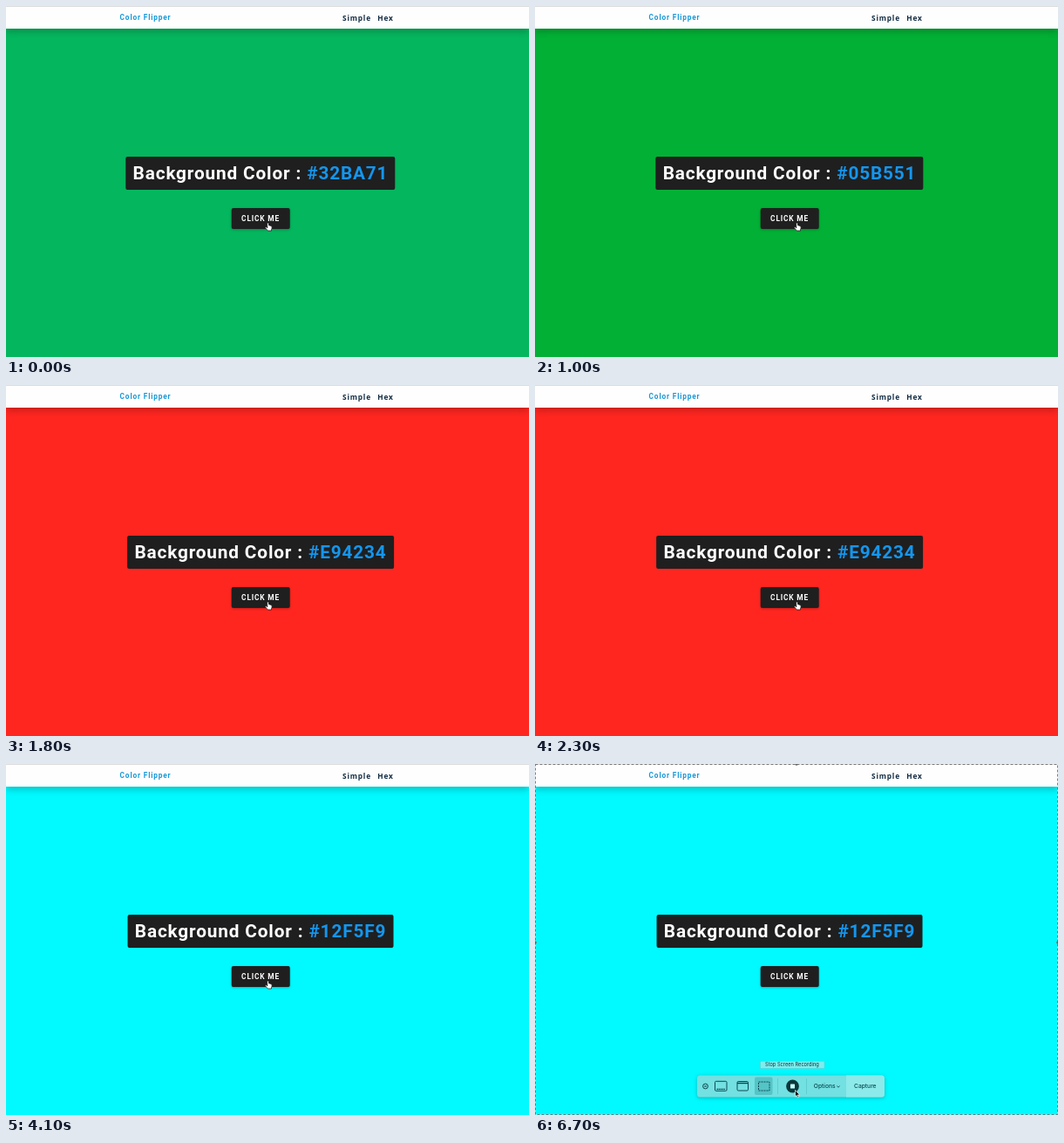
Animation of 600 by 403 pixels, one loop 6.8 s. Source, as an HTML page:

```html
<!DOCTYPE html>
<html lang="en">
<head>
<meta charset="utf-8">
<title>Color Flipper</title>
<style>
  :root { font-size: 8.32px; }
  html, body { margin: 0; width: 100%; height: 100%; overflow: hidden; }
  body { position: relative; letter-spacing: .1rem; font: 700 1rem Roboto, sans-serif; }
  body > * { position: absolute; white-space: nowrap; }
  nav { left: 0; top: 0; width: 600px; height: 26px; box-sizing: border-box; background: #fefefe;
    border-top: 1px solid #dcdcdc; box-shadow: 0 2.6px 7.8px rgba(0, 0, 0, .24); }
  nav span { position: absolute; top: 7px; line-height: 11px; color: #102a42;
    font-family: "Open Sans", sans-serif; }
  nav .logo { left: 130.6px; color: #1698d8; font-family: Roboto, sans-serif; }
  h2, button { left: 292px; transform: translateX(-50%); margin: 0; background: #1f1f1f;
    color: #fff; border-radius: 2px; letter-spacing: .1rem; }
  h2 { top: 173.2px; padding: 1rem; font-size: 2.5rem; line-height: 1; }
  h2 b { color: #1496ee; }
  button { top: 231.5px; height: 24.5px; padding: 0 11.4px; border: 0; font: inherit;
    letter-spacing: .1rem; box-shadow: 0 1px 3px rgba(0, 0, 0, .25); }
  svg { left: 0; top: 0; }
  svg text { font: 500 6.7px Inter, sans-serif; letter-spacing: 0; fill: #0b4a50; }
  svg .tip { font-size: 5.7px; font-weight: 400; fill: #06363a; }
</style>
</head>
<body>
<nav>
  <span class="logo">Color Flipper</span>
  <span style="left:386px">Simple</span>
  <span style="left:426.3px">Hex</span>
</nav>
<h2>Background Color : <b id="hex"></b></h2>
<button>CLICK ME</button>
<svg width="600" height="403" viewBox="0 0 600 403">
  <g id="recorder">
    <rect x=".5" y=".5" width="599" height="402" fill="none" stroke="#fff" stroke-opacity=".5"/>
    <rect x=".5" y=".5" width="599" height="402" fill="none" stroke="#555" stroke-opacity=".75" stroke-dasharray="3 2"/>
    <g fill="#666">
      <circle cx="300" cy="0" r="1.8"/><circle cx="0" cy="205" r="1.8"/><circle cx="600" cy="205" r="1.8"/>
    </g>
    <rect x="186" y="357.5" width="215" height="25" rx="3.5" fill="#73e0e1"
      style="filter:drop-shadow(0 1px 2px rgba(0,60,60,.35))"/>
    <path d="M357 357.5h40.5a3.5 3.5 0 0 1 3.5 3.5v18a3.5 3.5 0 0 1-3.5 3.5H357z" fill="#8deaea"/>
    <rect x="252" y="359.5" width="20.5" height="20.5" rx="2" fill="#55c4c6"/>
    <path d="M278.5 361v18M311.5 361v18" stroke="#5cc9ca" stroke-width=".8"/>
    <g fill="none" stroke="#0b4a50">
      <circle cx="195.5" cy="370" r="2.9"/>
      <path d="M194.3 368.8l2.4 2.4m0-2.4l-2.4 2.4" stroke-width=".8"/>
      <rect x="206.5" y="364.3" width="13.5" height="11" rx="1.2"/>
      <path d="M208.5 373.3h9.5" stroke-width="1.2" stroke-dasharray="1.6 .5"/>
      <rect x="232" y="364.5" width="12.5" height="10.5" rx="1.2"/>
      <path d="M232 366.5h12.5" stroke-width="1.4"/>
      <rect x="256.5" y="365" width="12.5" height="10" stroke-dasharray="2 1"/>
      <path d="M346.3 369.6l1.7 1.6 1.7-1.6" stroke-width=".9"/>
    </g>
    <circle cx="295.5" cy="370" r="7.4" fill="#08383c"/>
    <rect x="293" y="367.5" width="5" height="5" rx=".5" fill="#c8ffff"/>
    <text x="319.8" y="372.4">Options</text>
    <text x="366" y="372.4">Capture</text>
    <g id="tip">
      <rect x="258.5" y="341.2" width="73.5" height="8.4" fill="#80eced" stroke="#5fd0d2" stroke-width=".6"/>
      <text class="tip" x="264" y="347.4">Stop Screen Recording</text>
    </g>
  </g>
  <g id="cursor" stroke-linejoin="round">
    <path id="hand" fill="#fff" stroke="#111" stroke-width=".7"
      d="M-1 .6Q0-.6 .8.6L1.2 3 2.4 3.1 3.4 3.6 4.5 4Q5 6.2 4 7.6V9H-.2L-3 5.7Q-3.2 4.4-1.9 4.8L-.6 5.8Z"/>
    <path id="arrow" fill="#000" stroke="#fff" stroke-width=".7"
      d="M0 0V7.4L1.7 5.9 2.9 8.6 4.1 8.1 2.9 5.4H5.2Z"/>
  </g>
</svg>
<script>
  const LOOP = 6800, STEP = 100;
  // start time, label, page colour
  const flips = [
    [0, "#32BA71", "#04b65e"],
    [300, "#B9082E", "#c20021"],
    [1000, "#05B551", "#02b035"],
    [1800, "#E94234", "#ff2620"],
    [2600, "#12F5F9", "#00faff"],
  ];
  // time, x, y of the pointer
  const path = [[0, 300.5, 249], [5000, 300.5, 249], [5400, 299.5, 243.5],
    [5600, 299.5, 243.5], [6300, 298.5, 374.5], [LOOP, 298.5, 374.5]];
  const RECORDER = 5600, TIP = 6400;
  const el = id => document.getElementById(id);
  const show = (id, on) => el(id).style.display = on ? "" : "none";
  const ease = p => p * p * (3 - 2 * p);

  function pointer(t) {
    const i = path.findIndex(k => k[0] > t);
    const [t0, x0, y0] = path[i - 1], [t1, x1, y1] = path[i];
    const p = ease((t - t0) / (t1 - t0));
    return [x0 + (x1 - x0) * p, y0 + (y1 - y0) * p];
  }

  function draw(now) {
    const t = Math.floor(now % LOOP / STEP) * STEP;
    const [, label, color] = flips.filter(f => f[0] <= t).pop();
    document.body.style.background = color;
    el("hex").textContent = label;
    el("cursor").setAttribute("transform", `translate(${pointer(t)})`);
    show("recorder", t >= RECORDER);
    show("tip", t >= TIP);
    show("hand", t < RECORDER);
    show("arrow", t >= RECORDER);
  }

  const start = performance.now();
  (function tick() {
    draw(performance.now() - start);
    requestAnimationFrame(tick);
  })();
</script>
</body>
</html>
```
